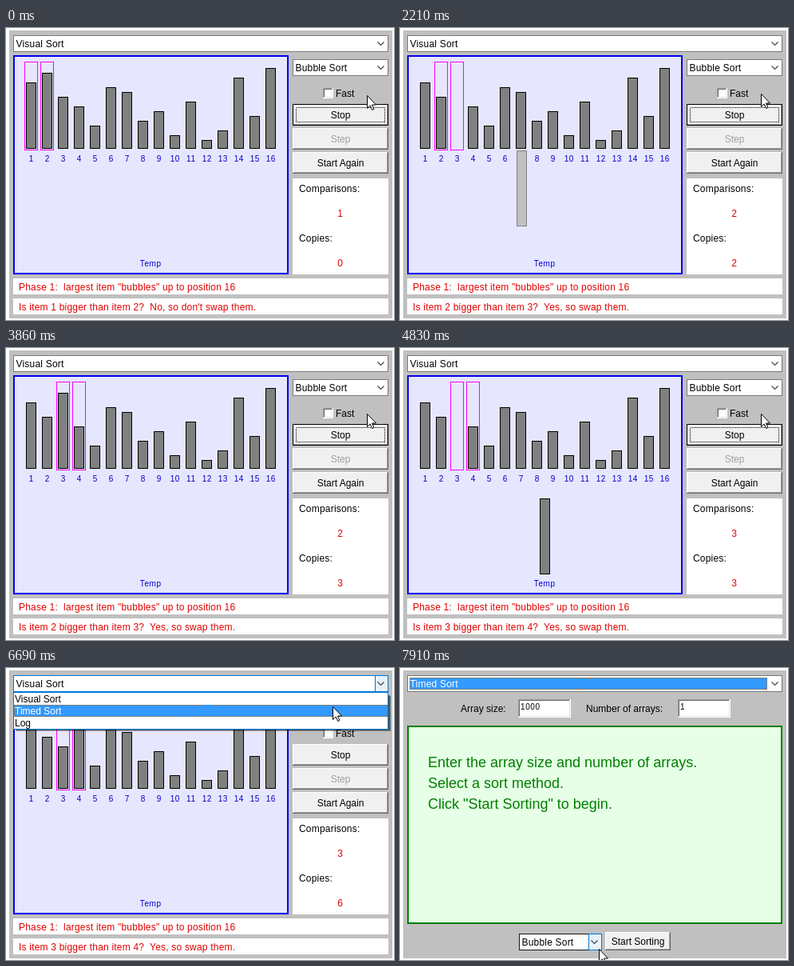
These frames come from a looping animation (486 by 365 pixels, 8000 ms). An HTML page:

```html
<!DOCTYPE html>
<html lang="en">
<head>
<meta charset="utf-8">
<title>Sort lab</title>
<style>
  html, body { margin: 0; width: 100%; height: 100%; overflow: hidden; background: #fff; }
  svg { display: block; }
  text { font: 12px "Liberation Sans", Arial, sans-serif; white-space: pre; }
  rect, .crisp { shape-rendering: crispEdges; }
  .wide { letter-spacing: .2px; }
  .small { font-size: 10px; letter-spacing: .6px; }
  .big { font-size: 18px; }
  .mid { text-anchor: middle; }
</style>
</head>
<body>
<svg id="stage" width="486" height="365" viewBox="0 0 486 365"></svg>
<script>
const LOOP = 8000;
const RED = '#e00000', NAVY = '#0000c8', GREEN = '#007f00', BLUE = '#0078d7', PICK = '#3399ff';

// ---------- markup helpers ----------
const box = (x, y, w, h, fill, extra = '') =>
  `<rect x="${x}" y="${y}" width="${w}" height="${h}" fill="${fill}" ${extra}/>`;
const frame = (x, y, w, h, fill, stroke, extra = '') =>
  box(x + .5, y + .5, w - 1, h - 1, fill, `stroke="${stroke}" ${extra}`);
const label = (x, y, s, fill = '#000', cls = '', id = '') =>
  `<text x="${x}" y="${y}" fill="${fill}" class="${cls}" id="${id}">${s}</text>`;
const dotted = (x, y, w, h, color) =>
  frame(x, y, w, h, 'none', color, 'stroke-dasharray="1 1"');

function combo(id, x, y, w, text) {
  const right = x + w;
  return frame(x, y, w, 21, '#fff', '#7a7a7a', `id="${id}"`) +
    frame(right - 17, y, 17, 21, '#e5f1fb', BLUE, `id="${id}Hot"`) +
    label(x + 3.5, y + 15, text, '#000', 'wide', id + 'Text') +
    `<path d="M${right - 13.5} ${y + 8.5}l4 4 4-4" fill="none" stroke="#404040" stroke-width="1.1"/>`;
}

function bevel(x, y, w, h, text, color = '#000') {
  const r = x + w, b = y + h;
  return box(x, y, w, h, '#696969') + box(x, y, w - 1, h - 1, '#fff') +
    box(x + 1, y + 1, w - 2, h - 2, '#a0a0a0') + box(x + 1, y + 1, w - 3, h - 3, '#f0f0f0') +
    label((x + r) / 2, Math.round((y + b) / 2) + 4, text, color, 'mid');
}

function field(x, y, w, h, text = '') {
  return box(x, y, w, h, '#fff') + box(x, y, w - 1, h - 1, '#a0a0a0') +
    box(x + 1, y + 1, w - 2, h - 2, '#e3e3e3') + box(x + 1, y + 1, w - 3, h - 3, '#696969') +
    box(x + 2, y + 2, w - 4, h - 4, '#fff') + label(x + 3, y + 13, text, '#000', 'small');
}

// ---------- bars ----------
const values = [13, 15, 10, 8, 4, 12, 11, 5, 7, 2, 9, 1, 3, 14, 6, 16];
const TEMP = -1;
const tall = v => 6 * v + 5;
const place = (slot, v) => slot === TEMP
  ? [175, 283 - tall(v)]
  : [25 + 20 * slot, 151 - tall(v)];

// value, from slot, to slot, start, duration
const moves = [
  [15, 1, TEMP, 870, 700], [10, 2, 1, 1670, 217], [15, TEMP, 2, 2004, 780],
  [15, 2, TEMP, 4052, 688], [8, 3, 2, 4860, 217], [15, TEMP, 3, 5188, 740]
];

const bars = values.map((v, i) =>
  frame(...place(i, v), 13, tall(v), '#808080', '#000', `id="bar${v}"`));
bars.push(bars.splice(1, 1)[0]);  // the bar that travels most lies on top

// ---------- pages ----------
const visual =
  frame(10, 35, 343, 272, '#e6e6ff', '#0000f0') + frame(9, 34, 345, 274, 'none', '#0000f0') +
  values.map((v, i) => label(31.8 + 20 * i, 167, i + 1, NAVY, 'small mid')).join('') +
  label(181.3, 298, 'Temp', NAVY, 'small mid') +
  frame(23, 42, 17, 111, 'none', '#f0f', 'id="mark0"') +
  frame(43, 42, 17, 111, 'none', '#f0f', 'id="mark1"') +
  bars.join('') +
  combo('side', 359, 39, 120, 'Bubble Sort') +
  field(397, 75, 13, 13) + label(413, 86, 'Fast') +
  bevel(359, 95, 120, 27, 'Stop') +
  `<g id="focus">${frame(359, 95, 120, 27, 'none', '#000')}${dotted(363, 99, 112, 19, '#000')}</g>` +
  bevel(359, 125, 120, 27, 'Step', '#a0a0a0') +
  bevel(359, 155, 120, 27, 'Start Again') +
  box(359, 188, 120, 120, '#fff') +
  label(367, 205, 'Comparisons:', '#000', 'wide') + label(418.5, 236, '', RED, 'mid', 'compares') +
  label(367, 267, 'Copies:', '#000', 'wide') + label(418.5, 298, '', RED, 'mid', 'copies') +
  box(9, 313, 470, 20, '#fff') + box(9, 338, 470, 20, '#fff') +
  label(16, 328, 'Phase 1:  largest item "bubbles" up to position 16', RED, 'wide') +
  label(16, 353, '', RED, 'wide', 'message');

const timed =
  label(76, 55, 'Array size:') + field(148, 39, 66, 23, '1000') +
  label(233, 55, 'Number of arrays:') + field(348, 39, 66, 23, '1') +
  frame(10, 73, 468, 246, '#e6ffe6', GREEN) + frame(9, 72, 470, 248, 'none', GREEN) +
  ['Enter the array size and number of arrays.', 'Select a sort method.',
    'Click "Start Sorting" to begin.']
    .map((s, i) => label(35, 124 + 26 * i, s, GREEN, 'big')).join('') +
  combo('low', 149, 332, 104, 'Bubble Sort') +
  bevel(257, 330, 82, 23, 'Start Sorting');

const menu =
  box(13, 35, 469, 44, '#000', 'opacity=".35"') + box(12, 34, 469, 44, '#000', 'opacity=".35"') +
  frame(9, 30, 470, 47, '#fff', BLUE) +
  `<g id="pick">${box(10, 46, 468, 15, PICK)}${dotted(10, 46, 468, 15, '#c06600')}</g>` +
  ['Visual Sort', 'Timed Sort', 'Log']
    .map((s, i) => label(11, 43 + 15 * i, s, '#000', '', 'item' + i)).join('');

document.getElementById('stage').innerHTML =
  box(0, 0, 486, 365, '#fff') + box(4, 3, 480, 360, '#c0c0c0') +
  `<g id="visual">${visual}</g><g id="timed">${timed}</g>` +
  combo('top', 9, 9, 470, 'Visual Sort') +
  `<g id="chosen">${box(12, 12, 448, 15, PICK)}${dotted(12, 12, 448, 15, '#c06600')}` +
  label(12.5, 24, 'Timed Sort', '#fff', 'wide') + '</g>' +
  `<g id="menu">${menu}</g>` +
  `<path id="cursor" d="M.5 .5V16.5L4.2 13 6.6 18.5 8.9 17.5 6.5 12H11.5Z" fill="#fff" stroke="#000"/>`;

const el = {};
document.querySelectorAll('[id]').forEach(n => { if (n.id) el[n.id] = n; });

// ---------- timeline ----------
const ticks = [0, 710, 890, 1010, 1160, 1280, 1400, 1520, 1670, 1800, 1940, 2060, 2210, 2360,
  2480, 2630, 2750, 2870, 3860, 4140, 4290, 4410, 4560, 4690, 4830, 4980, 5100, 5220, 5340,
  5460, 5580, 5730, 5930, 6050, 6180, 6300, 6420, 6540, 6690, 6970, 7120, 7400, 7550, 7670,
  7790, 7910];
// time, x, y
const path = [[0, 452, 84], [2060, 452, 84], [2210, 452, 82], [4980, 452, 82], [5580, 402, 9],
  [5730, 402, 13], [6180, 402, 13], [6540, 409, 49], [6690, 409, 48], [6970, 403, 42],
  [7120, 403, 42], [7400, 395, 61], [7910, 249, 351]];

const passed = (t, times) => times.filter(k => t >= k).length;
const mix = (a, b, f) => Math.round(a + (b - a) * f);
const show = (node, on) => node.setAttribute('display', on ? 'inline' : 'none');
const set = (node, attrs) => { for (const k in attrs) node.setAttribute(k, attrs[k]); };

function pointer(t) {
  const i = path.findIndex(p => p[0] > t);
  if (i < 0) return path[path.length - 1].slice(1);
  const a = path[i - 1], b = path[i], f = (t - a[0]) / (b[0] - a[0]);
  return [mix(a[1], b[1], f), mix(a[2], b[2], f)];
}

function drawBars(t) {
  const clock = t >= 5930 ? t - 102 : t;  // sorting stalls briefly under the pointer
  for (const v of [15, 10, 8]) {
    let [x, y] = place(values.indexOf(v), v), moving = false;
    for (const [value, from, to, start, span] of moves) {
      if (value !== v || clock < start) continue;
      const f = Math.min(1, (clock - start) / span);
      const a = place(from, v), b = place(to, v);
      x = mix(a[0], b[0], f);
      y = mix(a[1], b[1], f);
      moving = f < 1;
    }
    set(el['bar' + v], { x: x + .5, y: y + .5,
      fill: moving ? '#c0c0c0' : '#808080', stroke: moving ? '#808080' : '#000' });
  }
}

function render(time) {
  const t = ticks[passed(time, ticks) - 1];
  const [x, y] = pointer(t);
  const second = t >= 6970, open = t >= 6180 && !second;
  el.cursor.setAttribute('transform', `translate(${x} ${y})`);

  show(el.visual, !second);
  show(el.timed, second);
  show(el.chosen, second);
  show(el.menu, open);
  show(el.focus, t < 6180);
  show(el.topText, !second);

  const active = open || (second && t < 7120);
  const over = y < 30;
  el.top.setAttribute('stroke', active ? BLUE : over ? '#171717' : '#7a7a7a');
  show(el.topHot, active);
  show(el.sideHot, false);
  const lowOver = second && y >= 332 && x >= 149 && x < 253;
  el.low.setAttribute('stroke', lowOver ? '#171717' : '#7a7a7a');
  show(el.lowHot, lowOver && x >= 236);

  const row = y < 46 ? 0 : 1;
  el.pick.setAttribute('transform', `translate(0 ${row * 15 - 15})`);
  for (let i = 0; i < 3; i++) el['item' + i].setAttribute('fill', i === row ? '#fff' : '#000');

  const first = passed(t, [710, 3860]);
  el.mark0.setAttribute('x', 23.5 + 20 * first);
  el.mark1.setAttribute('x', 43.5 + 20 * first);
  const n = 1 + passed(t, [890, 4140]);
  el.compares.textContent = n;
  el.copies.textContent = passed(t, [1800, 2060, 2870, 4980, 5220, 6050]);
  el.message.textContent = `Is item ${n} bigger than item ${n + 1}?  ` +
    (n === 1 ? "No, so don't swap them." : 'Yes, so swap them.');
  drawBars(t);
}

const begin = performance.now();
function loop() {
  render((performance.now() - begin) % LOOP);
  requestAnimationFrame(loop);
}
loop();
</script>
</body>
</html>
```
